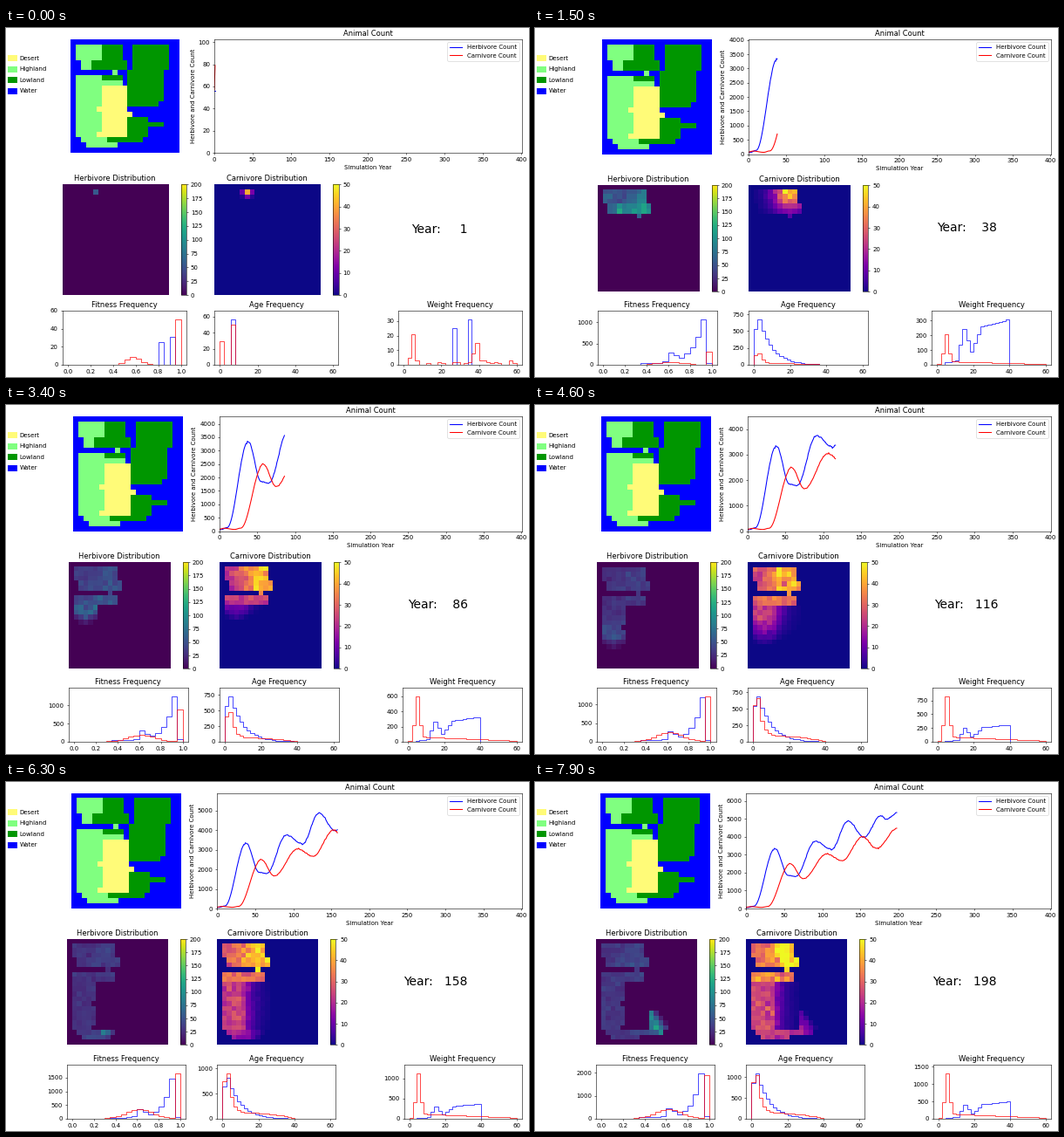
Recreate the animation shown at these times as a matplotlib script. Size 600 by 400 pixels, loop 8000 ms.

```python
import numpy as np
import matplotlib.pyplot as plt
from matplotlib.animation import FuncAnimation
from matplotlib.cm import ScalarMappable
from matplotlib.colors import ListedColormap, Normalize
from matplotlib.patches import Rectangle

W, H = 600, 400
FRAMES, INTERVAL = 80, 100
ROWS, COLS = 22, 21

plt.rcParams["font.family"] = "DejaVu Sans"
fig = plt.figure(figsize=(12, 8), dpi=50, facecolor="white")

# ---------------------------------------------------------------- island
WATER, DESERT, HIGH, LOW = range(4)
COLORS = ["#0000ff", "#fffb78", "#80ff80", "#009600"]
row, col = np.mgrid[:ROWS, :COLS]
island = np.full((ROWS, COLS), WATER)


def paint(kind, r0, r1, c0, c1):
    island[r0:r1 + 1, c0:c1 + 1] = kind


# North-west
paint(HIGH, 1, 3, 1, 5)
paint(LOW, 1, 3, 6, 9)
paint(HIGH, 4, 5, 2, 3)
paint(LOW, 4, 5, 4, 10)
paint(HIGH, 6, 6, 8, 8)
# West coast and desert
paint(HIGH, 7, 18, 1, 9)
paint(LOW, 7, 7, 6, 9)
paint(DESERT, 9, 18, 6, 10)
# South
paint(LOW, 15, 18, 11, 14)
paint(LOW, 16, 16, 15, 17)
paint(HIGH, 19, 19, 2, 6)
paint(LOW, 19, 19, 7, 13)
paint(HIGH, 20, 20, 3, 8)
for r, c in ((13, 5), (18, 5), (14, 11)):
    island[r, c] = DESERT
# East block, tapering towards the south
east = (row >= 1) & (row <= 12)
east &= (col >= 12 - (row > 5)) & (col <= 18 - row // 6)
island[east] = LOW

north = (row <= 6) & (col <= 10)
settled = (island != WATER) & ~((col > 10) & (row < 15))
grazed = settled & (island != DESERT)

# Year in which the spreading population reaches each cell.
arrival = 45 + 6 * (row - 6) + 2.5 * abs(col - 3) * (row > 8)
bend = (col > 5) & (row > 14) & (island != DESERT)
arrival = np.where(bend, 123 + 7 * (col - 5) + 5 * abs(19 - row), arrival)
arrival = np.where(north, 3 * (abs(row - 1) + abs(col - 6)), arrival)


def share(weight, total, seed):
    """Spread a head count over the cells, with a little scatter."""
    noise = np.random.default_rng(seed).normal(1, 0.12, weight.shape)
    weight = weight * np.clip(noise, 0.6, 1.4)
    return total * weight / weight.sum()


def herbivore_map(year):
    since = year - arrival
    low = island == LOW
    weight = np.clip(since / 15, 0, 1) * np.where(low, 1.25, 1)
    weight *= 1 + np.where(low, 1.5, 0.7) * np.exp(-((since - 17) / 13) ** 2)
    return share(weight * grazed, herb[year], year)


def carnivore_map(year):
    dist = np.hypot(row - 1, col - 6 - min(2, 0.05 * (year - 1)))
    top = np.exp(-(dist / (0.8 + 0.002 * year ** 2)) ** 2)
    top *= 1 + 0.65 / (1 + np.exp(5 - col))
    low = np.clip((year - arrival - 5) / 35, 0, 1)
    low *= np.where(row <= 8, 1.15, 0.85)
    low *= np.where(island == DESERT, np.exp((5 - col) / 1.5), 1)
    return share(np.where(north, top, low) * settled, carn[year], year + 500)


# ---------------------------------------------------------------- counts
def eased_curve(turns, seed):
    """Yearly counts, eased between turning points, slightly noisy."""
    t, v = np.array(turns, float).T
    x = np.arange(201)
    i = np.clip(np.searchsorted(t, x, "right") - 1, 0, len(t) - 2)
    u = (x - t[i]) / (t[i + 1] - t[i])
    y = v[i] + (v[i + 1] - v[i]) * (1 - np.cos(np.pi * u)) / 2
    noise = np.random.default_rng(seed).normal(0, 18, x.size)
    return y + noise * np.clip(y / 2500 - 0.3, 0, 1)


herb = eased_curve([(0, 56), (2, 56), (10, 130), (38, 3345), (55, 1850),
                    (65, 1790), (91, 3755), (112, 3290), (134, 4870),
                    (155, 3980), (177, 5160), (184, 4970), (200, 5360)], 3)
carn = eased_curve([(0, 57), (1, 79), (6, 106), (20, 62), (28, 110),
                    (58, 2490), (75, 1660), (106, 3045), (126, 2660),
                    (153, 4000), (171, 3350), (200, 4490)], 8)

# ---------------------------------------------------------------- histograms
FIT, BIN = np.arange(20), np.arange(30)


def bell(x, centre, width):
    return np.exp(-((x - centre) / width) ** 2)


def herb_fitness(year):
    reach = 1.5 + 0.9 * np.exp(-year / 60)
    rise = np.exp((FIT - 18) / reach) + 0.22 * bell(FIT, 12.3, 0.8)
    rise += 0.03 * (FIT > 6)
    return np.where(FIT < 19, rise, 0.05) * (FIT > 6)


def carn_fitness(year):
    return np.where(FIT < 19, bell(FIT, 12, 3.6), 4.7)


def herb_age(year):
    return np.where(BIN > 0, 0.76 ** (BIN - 1.0), 0.8)


def carn_age(year):
    young = np.where(BIN > 0, 0.86 * 0.4 ** (BIN - 1.0), 0.7)
    return young + 0.14 * np.clip(1 - (BIN / 20) ** 3, 0, 1)


def herb_weight(year):
    shape = np.interp(BIN, [2, 5, 7, 9, 12, 19], [0.05, 0.1, 0.8, 0.3, 0.85, 1])
    return shape * ((BIN > 1) & (BIN < 20))


def carn_weight(year):
    return bell(BIN, 2, 1) + 0.12 * (1 - BIN / 36) * (BIN > 3)


def spikes(size, heights):
    out = np.zeros(size)
    out[list(heights)] = list(heights.values())
    return out


rng = np.random.default_rng(5)
first_weights = np.histogram(
    np.r_[rng.normal(5, 0.9, 29), rng.normal(38.6, 1.4, 24),
          rng.uniform(8, 60, 26)], BIN.size, (0, 60))[0]
first_fitness = 9 * bell(FIT, 11.2, 1.8) + spikes(20, {19: 50})

# Founders and grown population, herbivores then carnivores.
SHAPES = {
    "fitness": [(spikes(20, {16: 25, 18: 31}), herb_fitness),
                (first_fitness, carn_fitness)],
    "age": [(spikes(30, {3: 56}), herb_age),
            (spikes(30, {0: 29, 3: 50}), carn_age)],
    "weight": [(spikes(30, {13: 25, 17: 31}), herb_weight),
               (first_weights, carn_weight)],
}


def bin_counts(first, grown, year, total):
    mix = min(1, (year - 1) / 12)
    late = grown(year)
    share_of = (1 - mix) * first / first.sum() + mix * late / late.sum()
    return np.round(total * share_of)


# ---------------------------------------------------------------- figure
def panel(title=None, frame=True):
    ax = fig.add_axes([0, 0, 0.1, 0.1], label=f"panel{len(fig.axes)}")
    if title:
        ax.set_title(title)
    if not frame:
        ax.axis("off")
    return ax


def place(ax, x0, y0, x1, y1):
    ax.set_position([x0 / W, 1 - y1 / H, (x1 - x0) / W, (y1 - y0) / H])


def heat(title, cmap, top, step):
    ax, cax = panel(title, frame=False), panel()
    norm = Normalize(0, top)
    img = ax.imshow(np.zeros((ROWS, COLS)), cmap=cmap, norm=norm,
                    aspect="auto", interpolation="nearest")
    fig.colorbar(ScalarMappable(norm, cmap), cax=cax,
                 ticks=range(0, top + 1, step))
    return ax, cax, img


def histogram(title, top, count, tick):
    ax = panel(title)
    edges = np.linspace(0, top, count + 1)
    pair = [ax.stairs(np.zeros(count), edges, color=c, lw=1) for c in "br"]
    ax.set_xlim(-0.05 * top, 1.05 * top)
    ax.set_xticks(np.arange(0, top + tick / 2, tick))
    return ax, pair


land_ax = panel(frame=False)
land_ax.imshow(island, cmap=ListedColormap(COLORS), vmin=0, vmax=3,
               aspect="auto", interpolation="nearest")

for i, (name, kind) in enumerate([("Desert", DESERT), ("Highland", HIGH),
                                  ("Lowland", LOW), ("Water", WATER)]):
    y = 34.5 + 12.5 * i
    fig.add_artist(Rectangle((1.5 / W, 1 - (y + 3.5) / H), 11 / W, 7 / H,
                             transform=fig.transFigure, lw=0,
                             color=COLORS[kind]))
    fig.text(15.5 / W, 1 - y / H, name, va="center_baseline")

count_ax = panel("Animal Count")
count_ax.set(xlim=(0, 401), xlabel="Simulation Year",
             ylabel="Herbivore and Carnivore Count")
count_ax.set_xticks(range(0, 401, 50))
herb_line, = count_ax.plot([], [], "b", label="Herbivore Count")
carn_line, = count_ax.plot([], [], "r", label="Carnivore Count")
count_ax.legend(loc="upper right")

herb_ax, herb_bar, herb_img = heat("Herbivore Distribution", "viridis",
                                   200, 25)
carn_ax, carn_bar, carn_img = heat("Carnivore Distribution", "plasma",
                                   50, 10)
hists = {
    "fitness": histogram("Fitness Frequency", 1, 20, 0.2),
    "age": histogram("Age Frequency", 60, 30, 20),
    "weight": histogram("Weight Frequency", 60, 30, 20),
}
year_text = fig.text(0, 0, "", fontsize=20)

# The grid shifts as labels widen: first year, then left edge, middle edge,
# column width, bottom of the top row and text position in pixels.
GRIDS = [(1, 64.5, 239, 142.5, 143, 465),
         (5, 68, 242, 140, 143.7, 463),
         (31, 71.5, 245, 137.3, 144.5, 461),
         (100, 71, 244, 136.5, 144.5, 458),
         (131, 70, 242.3, 136, 145, 456)]


def arrange(year):
    grid = [g for g in GRIDS if g[0] <= year][-1]
    _, left, mid, width, bottom, text_x = grid
    right = 592
    land_half = (bottom - 13) * COLS / ROWS / 2
    centre = left + width / 2
    place(land_ax, centre - land_half, 13, centre + land_half, bottom)
    place(count_ax, mid, 13, right, bottom)

    heat_w = 0.85 * width
    heat_h = heat_w * ROWS / COLS
    heat_y = 385.75 - bottom
    y0, y1 = heat_y - heat_h / 2, heat_y + heat_h / 2
    for x, ax, bar in ((left, herb_ax, herb_bar), (mid, carn_ax, carn_bar)):
        place(ax, x, y0, x + heat_w, y1)
        place(bar, x + width - heat_h / 20, y0, x + width, y1)

    starts = left, mid, right + 0.5 - width
    for (ax, _), x in zip(hists.values(), starts):
        place(ax, x, 324, min(right, x + width), 386)
    year_text.set_position((text_x / W, 1 - (heat_y - 8) / H))


def update(frame):
    year = int(1 + 2.5 * frame)
    arrange(year)
    year_text.set_text(f"Year:{year:6}")

    x = np.arange(year + 1)
    herb_line.set_data(x, herb[:year + 1])
    carn_line.set_data(x, carn[:year + 1])
    peak = max(herb[:year + 1].max(), carn[:year + 1].max())
    count_ax.set_ylim(0, max(102.5, 1.2 * peak))

    herb_img.set_data(herbivore_map(year))
    carn_img.set_data(carnivore_map(year))

    for name, (ax, pair) in hists.items():
        top = 0
        totals = herb[year], carn[year]
        for stairs, shape, total in zip(pair, SHAPES[name], totals):
            values = bin_counts(*shape, year, total)
            stairs.set_data(values)
            top = max(top, values.max())
        ax.set_ylim(0, 1.2 * top)
    return []


anim = FuncAnimation(fig, update, frames=FRAMES, interval=INTERVAL,
                     repeat=True, repeat_delay=0, blit=False)
plt.show()
```
